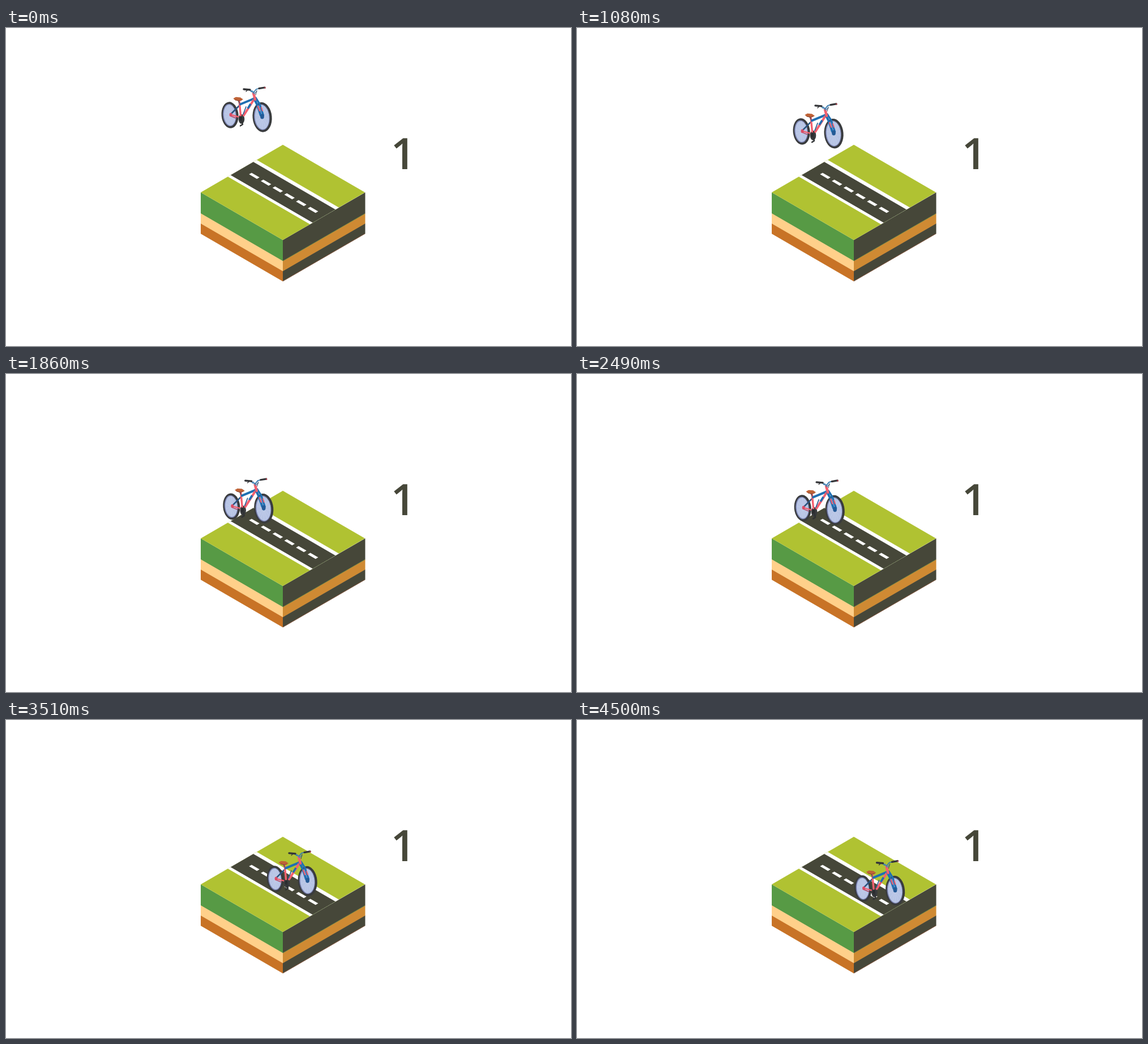
Animation of 998 by 561 pixels, one loop 4530 ms. Source, as an HTML page with a canvas:

```html
<!DOCTYPE html>
<html lang="en">
<head>
<meta charset="utf-8">
<title>Bicycle on a road tile</title>
<style>
  html, body { margin: 0; width: 100%; height: 100%; overflow: hidden; background: #fff; }
  canvas { display: block; }
</style>
</head>
<body>
<canvas id="stage" width="998" height="561"></canvas>
<script>
const ctx = document.getElementById('stage').getContext('2d');
const LOOP = 4530, STEP = 30;
const DARK = '#464739', RED = '#f4606f', BLUE = '#1f6fb2', TYRE = '#393b3d';

function poly(points, color) {
  ctx.beginPath();
  points.forEach(([x, y]) => ctx.lineTo(x, y));
  ctx.closePath();
  ctx.fillStyle = color;
  ctx.fill();
}

function line(points, color, width, cap = 'round') {
  ctx.beginPath();
  points.forEach(([x, y]) => ctx.lineTo(x, y));
  ctx.strokeStyle = color;
  ctx.lineWidth = width;
  ctx.lineCap = cap;
  ctx.lineJoin = 'round';
  ctx.stroke();
}

function oval(x, y, rx, ry, tilt, color) {
  ctx.beginPath();
  ctx.ellipse(x, y, rx, ry, tilt, 0, Math.PI * 2);
  ctx.fillStyle = color;
  ctx.fill();
}

// Tile coordinates: a runs up the back-left edge, b down the front-left edge.
const iso = (a, b) => [344 + 145 * (a + b), 290 + 84 * (b - a)];
const patch = (a0, a1, b0, b1, color) =>
  poly([iso(a0, b0), iso(a1, b0), iso(a1, b1), iso(a0, b1)], color);

function layer(top, bottom, left, right) {
  poly([[344, 290 + top], [489, 374 + top], [489, 374 + bottom], [344, 290 + bottom]], left);
  poly([[489, 374 + top], [634.5, 290 + top], [634.5, 290 + bottom], [489, 374 + bottom]], right);
}

function drawTile() {
  layer(0, 37.5, '#579a45', DARK);
  layer(37, 55.5, '#ffd08a', '#cf8a33');
  layer(55, 73, '#c87326', DARK);
  line([[489, 411], [634, 327.5]], '#5f8a45', 0.8, 'butt');
  line([[489, 446.6], [634, 362.8]], '#9a5a3c', 0.7, 'butt');

  patch(0, 1, 0, 1, '#b0c232');
  patch(0.33, 0.683, 0, 1, '#fff');
  patch(0.364, 0.641, 0, 1, DARK);
  for (let k = 0; k < 6; k++) {
    const b = 0.152 + 0.143 * k;
    patch(0.484, 0.516, b - 0.048, b + 0.048, '#fff');
  }
  ctx.setLineDash([5, 3]);
  line([iso(0.37, 1), iso(0.64, 1)], '#6f8255', 0.7, 'butt');
  ctx.setLineDash([]);
}

function wheel(x, y, rx, ry) {
  const tilt = -0.09;
  oval(x, y, rx, ry, tilt, TYRE);
  oval(x - 0.7, y, rx - 3.2, ry - 3.5, tilt, '#777fae');
  oval(x - 0.4, y, rx - 4.5, ry - 4.9, tilt, '#b7c4e5');
  ctx.globalAlpha = 0.3;
  for (let i = 0; i < 7; i++) {
    const angle = i * Math.PI / 7 + 0.2;
    const dx = Math.cos(angle) * (rx - 5), dy = Math.sin(angle) * (ry - 5.5);
    line([[x - dx, y - dy], [x + dx, y + dy]], '#dfe6f5', 0.7);
  }
  ctx.globalAlpha = 1;
}

function drawBike() {
  wheel(395.6, 153.6, 15, 23.3);
  wheel(452.6, 157.3, 17, 26.4);

  // rear stays
  line([[397, 152], [413, 136]], '#29537f', 2.6);
  line([[397, 153], [415, 158]], RED, 2.4);
  line([[396, 155], [406, 159]], '#b8415c', 1.5);
  oval(397, 153, 2.5, 3.3, 0, '#d94d66');

  // drivetrain
  oval(416, 160.5, 5.3, 8.6, 0, TYRE);
  oval(415, 160, 2.2, 4, 0, '#292c2f');
  line([[416, 162], [418, 170], [414, 172.5]], '#303234', 2.4);

  // frame
  line([[412, 128], [414.5, 154]], RED, 3.4);
  line([[414, 134.5], [437, 125]], BLUE, 4);
  line([[438, 126], [420, 154]], RED, 4);
  line([[432, 134], [427, 142]], BLUE, 3.6, 'butt');
  line([[424, 139], [419, 152]], '#315f93', 1.7);

  // fork
  line([[438, 124], [444, 136], [450, 154]], BLUE, 4);
  line([[441, 123], [448, 134], [454.5, 154]], BLUE, 3.3);
  line([[445, 138], [448, 146]], RED, 2.2);
  line([[451, 140], [453, 146]], RED, 1.8);
  oval(452.5, 156, 3.4, 4.6, 0, '#245a96');
  line([[437, 115], [440, 126]], RED, 4.5);

  // saddle
  line([[410, 127], [412, 132]], '#6c565a', 2);
  poly([[401.5, 124.3], [406, 121.8], [414, 122.5], [419, 126], [416, 127.6], [410, 128.6], [404, 127]], '#bf6337');
  line([[405, 127], [411, 128.5], [416, 127.3]], '#823f2c', 1);

  // handlebar
  line([[430, 108.5], [433, 112], [438, 113], [442, 108], [448, 106.5]], '#347aaf', 1.8);
  line([[434, 110], [438, 116], [443, 112]], '#4b87b5', 1.4);
  line([[443, 110], [441, 118]], '#39465c', 1);
  line([[420, 108], [431, 109]], '#353639', 3.4);
  line([[447, 106.7], [457, 105]], '#353639', 3.2);
  line([[426, 110], [424, 112]], '#353639', 1.4);
  line([[457.2, 104.8], [457.7, 106]], '#ad3f4d', 2);
}

function drawNumber() {
  ctx.font = '600 77px "Open Sans", "Noto Sans", sans-serif';
  ctx.fillStyle = DARK;
  ctx.fillText('1', 709.5 - ctx.measureText('1').actualBoundingBoxRight, 249);
}

// Symmetric ease in and out, with the given power.
function ease(t, start, end, power) {
  const u = Math.min(1, Math.max(0, (t - start) / (end - start)));
  return u < 0.5 ? (2 * u) ** power / 2 : 1 - (2 - 2 * u) ** power / 2;
}

function frame(now) {
  const t = Math.floor((now % LOOP) / STEP) * STEP;
  const drop = ease(t, 365, 2075, 2);
  const ride = ease(t, 2385, 4230, 2.4);

  ctx.fillStyle = '#fff';
  ctx.fillRect(0, 0, 998, 561);
  drawTile();
  drawNumber();
  ctx.save();
  ctx.translate(2.8 * drop + 106.7 * ride, 82.7 * drop + 61 * ride);
  drawBike();
  ctx.restore();
  requestAnimationFrame(frame);
}

const start = performance.now();
frame(0);
function tick() {
  frame = null;
}
</script>
</body>
</html>
```
